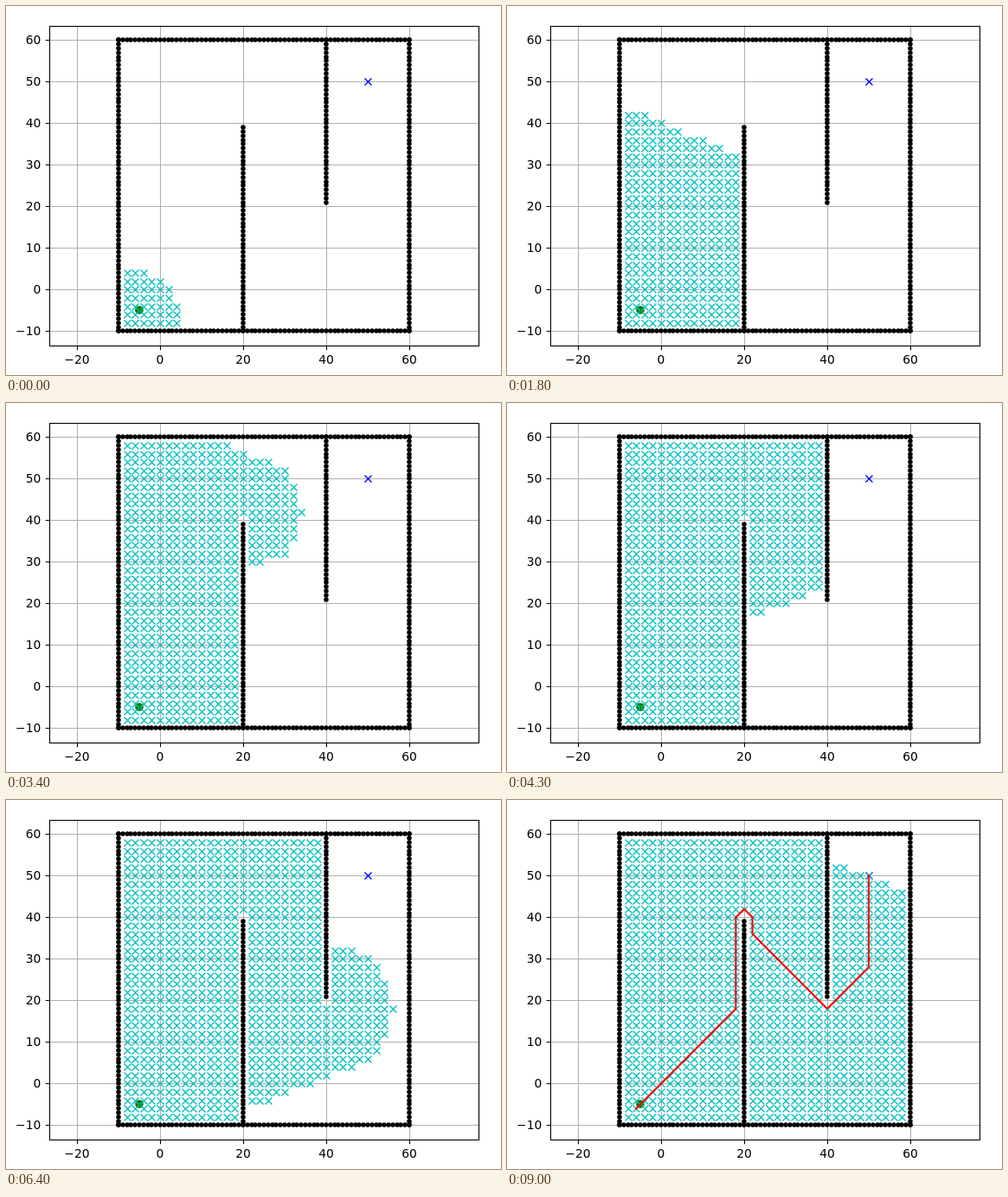
Animation, 572 px wide and 426 px high, one loop 9.1 s. Source, as an HTML page with a canvas:

```html
<!DOCTYPE html>
<html lang="en">
<head>
<meta charset="utf-8">
<title>Grid search</title>
<style>
  html, body { margin: 0; width: 100%; height: 100%; overflow: hidden; background: #fff; }
  canvas { display: block; }
</style>
</head>
<body>
<canvas id="plot" width="572" height="426"></canvas>
<script>
const ctx = document.getElementById('plot').getContext('2d');
const LOOP = 9100, TICK = 100, PATH_TICK = 89;
const BOX = { left: 50.5, top: 23.5, right: 546.5, bottom: 392.5 };
const FONT = '13.89px "DejaVu Sans", sans-serif';

const px = x => 178 + 4.8 * x;
const py = y => 327.4 - 4.8 * y;
const snap = v => Math.floor(v + 0.5);
const range = (from, to, step = 1) =>
  Array.from({ length: Math.floor((to - from) / step) + 1 }, (_, i) => from + i * step);

const walls = [
  ...range(-10, 60).flatMap(i => [[i, -10], [60, i], [i, 60], [-10, i]]),
  ...range(-10, 39).map(y => [20, y]),
  ...range(21, 60).map(y => [40, y])
];
const route = [[-6, -6], [18, 18], [18, 40], [20, 42], [22, 40], [22, 36], [40, 18], [50, 28], [50, 50]];

const isFree = (x, y) => x > -10 && x < 60 && y > -10 && y < 60 &&
  !(x === 20 && y <= 40) && !(x === 40 && y >= 20);

// Dijkstra on a grid of step 2; returns the cells in the order they are visited.
function search(start, goal) {
  const moves = [[1, 0], [0, 1], [-1, 0], [0, -1], [-1, -1], [-1, 1], [1, -1], [1, 1]];
  const id = (x, y) => x * 1000 + y;
  const open = new Map([[id(...start), { x: start[0], y: start[1], cost: 0 }]]);
  const closed = new Set();
  const order = [];
  while (open.size) {
    let key, cell = { cost: Infinity };
    for (const [k, c] of open) if (c.cost < cell.cost) { key = k; cell = c; }
    order.push([cell.x, cell.y]);
    if (cell.x === goal[0] && cell.y === goal[1]) break;
    open.delete(key);
    closed.add(key);
    for (const [dx, dy] of moves) {
      const x = cell.x + 2 * dx, y = cell.y + 2 * dy, k = id(x, y);
      const cost = cell.cost + Math.hypot(dx, dy);
      if (closed.has(k) || !isFree(x, y)) continue;
      if (!open.has(k) || open.get(k).cost >= cost) open.set(k, { x, y, cost });
    }
  }
  return order;
}
const visited = search([-6, -6], [50, 50]);

// Batches of ten cells: the pace slows down, then one batch per tick with a few stalls.
function visitedCount(tick) {
  const batches = tick <= 50
    ? Math.round(4 + 1.747 * tick - 0.00733 * tick * tick)
    : 23 + tick - [51, 73, 80, 86].filter(stall => stall <= tick).length;
  return Math.min(batches * 10 + 1, visited.length);
}

function lines(segments, color, width) {
  ctx.strokeStyle = color;
  ctx.lineWidth = width;
  ctx.beginPath();
  for (const [x1, y1, x2, y2] of segments) {
    ctx.moveTo(x1, y1);
    ctx.lineTo(x2, y2);
  }
  ctx.stroke();
}

function crosses(cells, color) {
  lines(cells.flatMap(([x, y]) => {
    const cx = snap(px(x)) + 0.5, cy = snap(py(y)) + 0.5;
    return [[cx - 4, cy - 4, cx + 4, cy + 4], [cx - 4, cy + 4, cx + 4, cy - 4]];
  }), color, 1.39);
}

function dots(cells, color, radius) {
  ctx.fillStyle = color;
  for (const [x, y] of cells) {
    ctx.beginPath();
    ctx.arc(snap(px(x)), snap(py(y)), radius, 0, 2 * Math.PI);
    ctx.fill();
  }
}

function axes() {
  const { left, top, right, bottom } = BOX;
  const xs = range(-20, 60, 20), ys = range(-10, 60, 10);
  const gx = x => snap(px(x)) + 0.5, gy = y => snap(py(y)) + 0.5;
  const label = v => String(v).replace('-', '\u2212');

  lines([...xs.map(x => [gx(x), top, gx(x), bottom]),
         ...ys.map(y => [left, gy(y), right, gy(y)])], '#b0b0b0', 1.11);
  lines([...xs.map(x => [gx(x), bottom, gx(x), bottom + 4.86]),
         ...ys.map(y => [left, gy(y), left - 4.86, gy(y)])], '#000', 1.11);

  ctx.font = FONT;
  ctx.fillStyle = '#000';
  ctx.textAlign = 'center';
  for (const x of xs) ctx.fillText(label(x), px(x), 413);
  ctx.textAlign = 'right';
  for (const y of ys) ctx.fillText(label(y), 40.3, snap(py(y) + 5));
}

function frame() {
  ctx.strokeStyle = '#000';
  ctx.lineWidth = 1.11;
  ctx.strokeRect(BOX.left, BOX.top, BOX.right - BOX.left, BOX.bottom - BOX.top);
}

function drawRoute() {
  ctx.save();
  ctx.strokeStyle = '#f00';
  ctx.lineWidth = 2.08;
  ctx.lineCap = 'square';
  ctx.lineJoin = 'round';
  ctx.beginPath();
  for (const [x, y] of route) ctx.lineTo(px(x), py(y));
  ctx.stroke();
  ctx.restore();
}

function draw(tick) {
  ctx.fillStyle = '#fff';
  ctx.fillRect(0, 0, 572, 426);
  axes();
  dots(walls, '#000', 2.78);
  dots([[-5, -5]], '#008000', 4.86);
  crosses([[50, 50]], '#00f');
  crosses(visited.slice(0, visitedCount(tick)), '#00bfbf');
  if (tick >= PATH_TICK) drawRoute();
  frame();
}

const begin = performance.now();
let shown = -1;
function play() {
  const tick = Math.floor((performance.now() - begin) % LOOP / TICK);
  if (tick !== shown) draw(shown = tick);
  requestAnimationFrame(play);
}
play();
</script>
</body>
</html>
```
